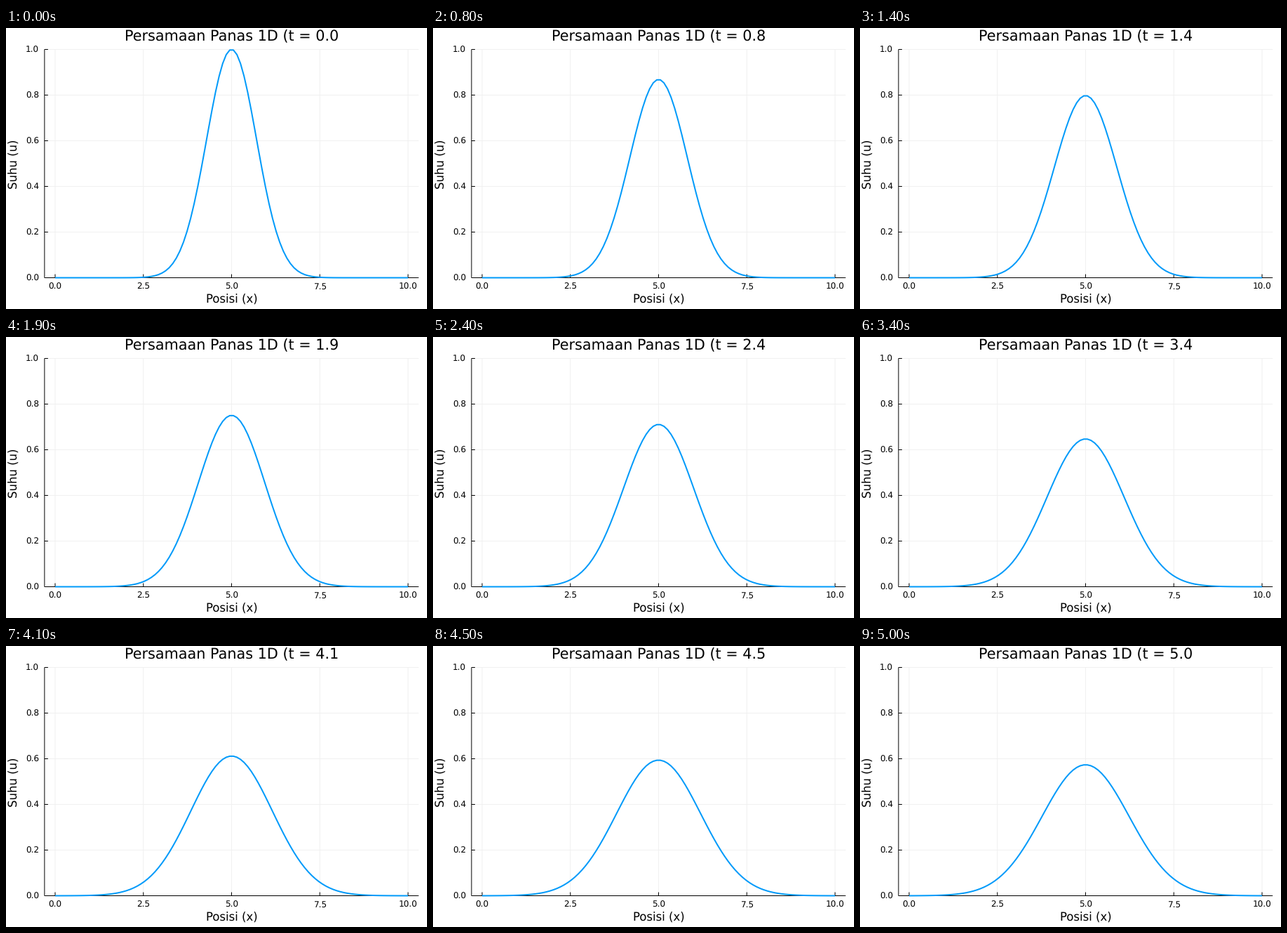
Recreate the animation shown at these times as a matplotlib script. Size 600x400 px, loop 5.1 s.

```python
import numpy as np
import matplotlib.pyplot as plt
from matplotlib.animation import FuncAnimation

W, H, DPI = 600, 400, 100
PT = 72 / DPI                       # points per pixel
LEFT, RIGHT, TOP, BOTTOM = 54.9, 588.1, 30.5, 355.5
FRAMES, INTERVAL = 51, 100

plt.rcParams.update({
    "font.family": "DejaVu Sans",
    "text.hinting": "none",
    "path.simplify": False,
})


def px(x):
    return 70 + 50.3 * x


def py(u):
    return BOTTOM - (BOTTOM - TOP) * u


def solve_heat(alpha=0.1, dx=0.1, dt=0.01, steps=10):
    """Explicit finite differences with fixed ends, one row per frame."""
    u = np.exp(-(x - 5) ** 2)
    rows = [u.copy()]
    for _ in range(FRAMES - 1):
        for _ in range(steps):
            u[1:-1] += alpha * dt / dx**2 * (u[2:] - 2 * u[1:-1] + u[:-2])
        rows.append(u.copy())
    return rows


x = np.linspace(0, 10, 100)
profiles = solve_heat()

fig = plt.figure(figsize=(W / DPI, H / DPI), dpi=DPI, facecolor="white")
ax = fig.add_axes([0, 0, 1, 1])
ax.set_xlim(0, W)
ax.set_ylim(H, 0)
ax.axis("off")


def segment(x0, y0, x1, y1, color="black", z=2):
    ax.plot([x0, x1], [y0, y1], color=color, lw=PT, zorder=z,
            solid_capstyle="butt", snap=False)


def label(x0, y0, text, size, ha="center", **kw):
    return ax.text(x0, y0, text, fontsize=size * PT, ha=ha,
                   va="baseline", color="black", **kw)


GRID = "#f0f0f0"
for v in np.arange(0, 10.1, 2.5):
    gx = px(v)
    segment(gx, TOP, gx, BOTTOM, GRID, 1)
    segment(gx, BOTTOM, gx, BOTTOM - 5)
    label(gx, 371.5, f"{v:.1f}", 12)

for v in np.linspace(0, 1, 6):
    gy = py(v)
    segment(LEFT, gy, RIGHT, gy, GRID, 1)
    segment(LEFT, gy, LEFT + 5, gy)
    label(47, gy + 4.5, f"{v:.1f}", 12, ha="right")

segment(LEFT, BOTTOM, RIGHT, BOTTOM)
segment(LEFT, TOP, LEFT, BOTTOM)

label(321.5, 392, "Posisi (x)", 16.5)
label(16.5, 193.5, "Suhu (u)", 16.5, rotation=90,
      rotation_mode="anchor")
title = label(321.5, 18, "", 20.8)
curve, = ax.plot([], [], color="#009afa", lw=2 * PT, zorder=3,
                 solid_capstyle="butt", solid_joinstyle="round")


def update(i):
    curve.set_data(px(x), py(profiles[i]))
    title.set_text(f"Persamaan Panas 1D (t = {i / 10:.1f}")
    return curve, title


anim = FuncAnimation(fig, update, frames=FRAMES, interval=INTERVAL,
                     init_func=lambda: update(0), repeat=True,
                     repeat_delay=0, blit=False)
plt.show()
```
